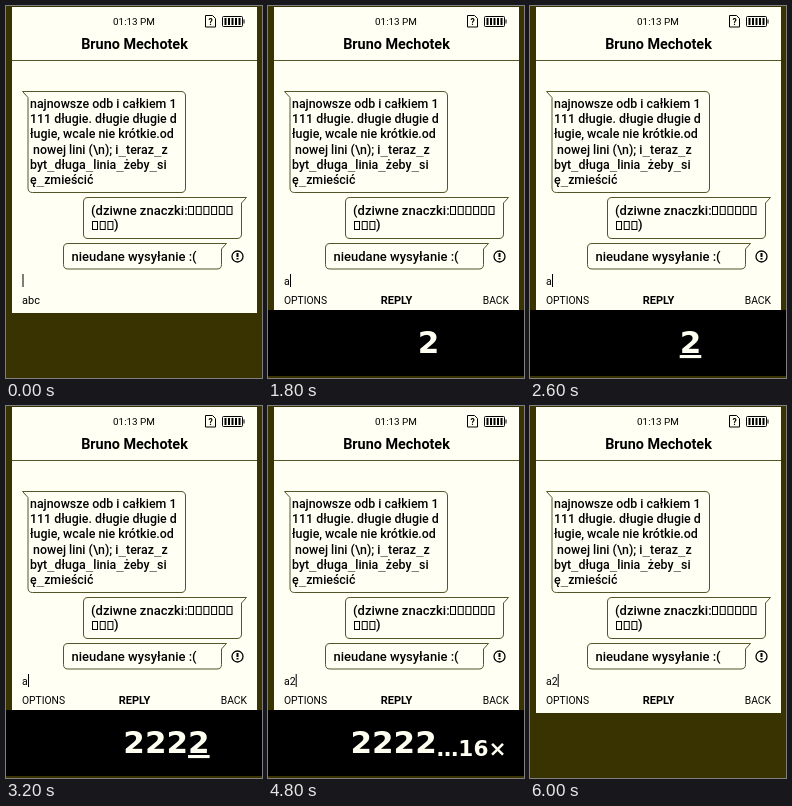
Animation of 256 by 372 pixels, one loop 6.2 s. Source, as an HTML page:

```html
<!DOCTYPE html>
<html lang="pl">
<head>
<meta charset="utf-8">
<title>Message thread</title>
<style>
  html, body { margin: 0; width: 100%; height: 100%; overflow: hidden; background: #383300; }
  svg { display: block; width: 256px; height: 372px; }
  text { white-space: pre; font-family: Roboto, Inter, sans-serif; fill: #000; }
  .body { font-size: 12.4px; font-weight: 500; }
  .reply { font-size: 13px; font-weight: 500; }
  .underscore { font-family: "DejaVu Sans Mono", monospace; font-weight: 400; }
  .menu { font-size: 10.3px; }
  .bold { font-weight: 700; }
  .line { fill: none; stroke: #000; }
  .bubble { fill: none; stroke: #55552a; }
  #keys { font: 700 31px "DejaVu Sans", sans-serif; fill: #fffff2; }
  #keys .count { font-size: 21.6px; }
  .recent { text-decoration: underline 1px; text-underline-offset: 2px; }
</style>
</head>
<body>
<svg viewBox="0 0 256 372">
  <rect width="256" height="372" fill="#383300"/>
  <rect x="6" y="1" width="245" height="306" fill="#fffff4"/>

  <text x="128" y="19" font-size="9.9" text-anchor="middle">01:13 PM</text>
  <path class="line" d="M199.5 9.5h7l3 3v8.5h-10z"/>
  <text x="204.5" y="18.5" font-size="8.5" class="bold" text-anchor="middle">?</text>
  <g class="line" transform="translate(-1 0)">
    <rect x="217.5" y="10.5" width="20" height="10" rx="1"/>
    <path stroke-width="2" d="M220.5 12v7m3.5-7v7m3.5-7v7m3.5-7v7m3.5-7v7"/>
    <path d="M239 13.5v4"/>
  </g>
  <text x="128.5" y="43" font-size="14.4" class="bold" text-anchor="middle">Bruno Mechotek</text>
  <path class="bubble" d="M6 54.5h245"/>

  <path class="bubble" d="M16.5 85.5H175q4.5 0 4.5 4.5V182q0 4.5 -4.5 4.5H26.5q-4.5 0 -4.5 -4.5V91.5z"/>
  <g id="incoming" class="body"></g>

  <path class="bubble" d="M240.5 191.5H82q-4.5 0 -4.5 4.5V228q0 4.5 4.5 4.5H231q4.5 0 4.5 -4.5V197z"/>
  <text class="reply" x="85" y="209">(dziwne znaczki:</text>
  <g id="boxes" class="line"></g>
  <text class="reply" x="108" y="223">)</text>

  <path class="bubble" d="M220.5 237.5H62q-4.5 0 -4.5 4.5V258.5q0 4.5 4.5 4.5H211q4.5 0 4.5 -4.5V243z"/>
  <text class="reply" x="65.5" y="255">nieudane wysyłanie :(</text>
  <circle class="line" cx="231.5" cy="250.5" r="5.5" stroke-width="1.3"/>
  <path class="line" stroke-width="2" d="M231.5 247v4m0 1v1.500"/>

  <text id="typed" x="16" y="279" font-size="10.5"></text>
  <rect id="cursor" y="268" width="1" height="13"/>
  <text id="mode" x="16" y="298" font-size="11">abc</text>
  <g id="menu" class="menu">
    <text x="16" y="298">OPTIONS</text>
    <text x="128.5" y="298" font-size="11" class="bold" text-anchor="middle">REPLY</text>
    <text x="241" y="298" text-anchor="end">BACK</text>
  </g>

  <g id="overlay">
    <rect y="304" width="256" height="66"/>
    <text id="keys" x="160.500" y="347" text-anchor="middle"></text>
  </g>
</svg>
<script>
const LOOP = 6200, STEP = 200;
const $ = id => document.getElementById(id);
const show = (id, on) => { $(id).style.display = on ? "" : "none"; };

const message = [
  "najnowsze odb i całkiem 1", "111 długie. długie długie d",
  "ługie, wcale nie krótkie.od", " nowej lini (\\n); i_teraz_z",
  "byt_długa_linia_żeby_si", "ę_zmieścić"
];
const withUnderscores = line =>
  line.replaceAll("_", '<tspan class="underscore">_</tspan>');
$("incoming").innerHTML = message.map((line, i) =>
  `<text x="24" y="${102 + i * 15.2}">${withUnderscores(line)}</text>`).join("");

const boxRow = (x, y, n) => Array.from({ length: n },
  (_, i) => `<rect x="${x + i * 7.7}" y="${y}" width="5" height="8"/>`).join("");
$("boxes").innerHTML = boxRow(182.5, 200.5, 6) + boxRow(86.5, 215.5, 3);

// Text of the key display: up to four digits, then a repeat counter.
function keyMarkup(count, recent) {
  const mark = recent ? "recent" : "";
  if (count > 4)
    return `2222<tspan class="count ${mark}" dy="3">…${count}×</tspan>`;
  return `${"2".repeat(count - 1)}<tspan class="${mark}">2</tspan>`;
}

let last = -1;
function render(time) {
  const t = Math.floor((time % LOOP) / STEP) * STEP;
  if (t === last) return;
  last = t;

  const typed = t < 1000 ? "" : t < 3800 ? "a" : "a2";
  $("typed").textContent = typed;
  $("cursor").setAttribute("x", [16.5, 22, 27.7][typed.length]);
  show("mode", !typed);
  show("menu", typed);

  const firstPress = t >= 800 && t < 2000;
  const holding = t >= 2600 && t < 5000;
  show("overlay", firstPress || holding);

  // A held key repeats 25 times a second after its initial delay.
  const repeats = Math.floor(14 + (t - 3600) / 40);
  const count = holding ? Math.max(1, Math.min(16, repeats)) : 1;
  const recent = t === 800 || t === 2600 || (t >= 3200 && t <= 3600);
  $("keys").innerHTML = keyMarkup(count, recent);
}

const start = performance.now();
function tick() {
  render(performance.now() - start);
  requestAnimationFrame(tick);
}
tick();
</script>
</body>
</html>
```
